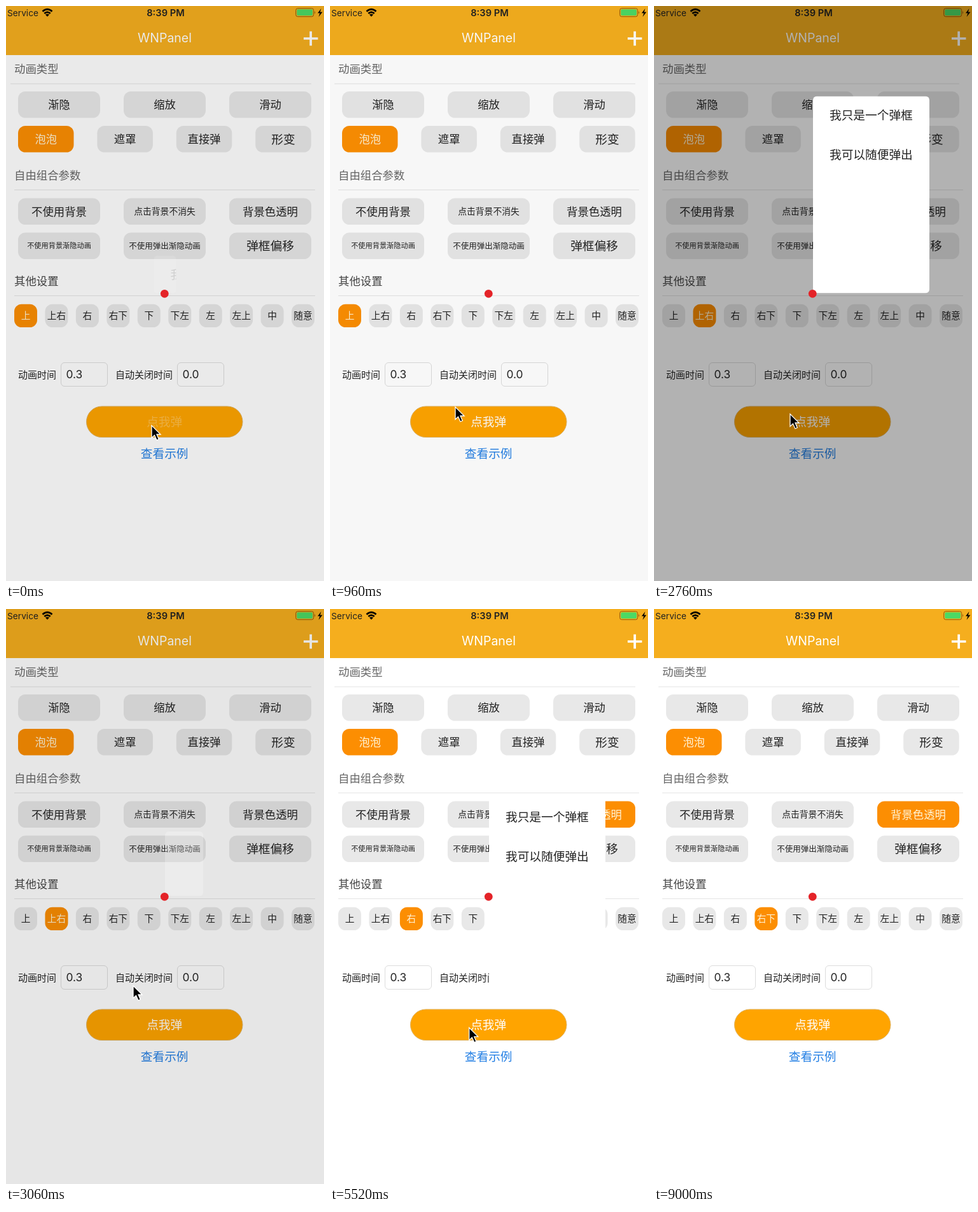
An HTML page for the animation above (9.3 s loop, 500x902 px).

```html
<!DOCTYPE html>
<html lang="zh-CN">
<head>
<meta charset="utf-8">
<title>Popup demo</title>
<style>
html, body { margin: 0; width: 100%; height: 100%; overflow: hidden; background: #fff; }
#stage { display: block; width: 100%; height: 100%; }
text { font-family: Inter, "Noto Sans CJK SC", "Noto Sans CJK", sans-serif; fill: #222; }
.chip rect { fill: #e8e8e8; }
.chip.on rect { fill: #fc8e02; }
.chip.on text { fill: #fff3d6; }
.rule { stroke: #e4e4e4; }
.field { fill: #fff; stroke: #dcdcdc; }
</style>
</head>
<body>
<svg id="stage" viewBox="0 0 500 902" preserveAspectRatio="none">
  <rect width="500" height="902" fill="#fff"/>
  <rect width="500" height="77" fill="#f5ae1e"/>
  <g id="status">
    <path d="M57.5 8.5Q65 1.8 72.5 8.5M60.3 11.7Q65 7.5 69.7 11.7" fill="none" stroke="#000" stroke-width="2.7"/>
    <path d="M62 13.6Q65 11.2 68 13.6L65 16.8Z"/>
    <rect x="455.7" y="3.7" width="28" height="13" rx="3" fill="none" stroke="#8a5c10"/>
    <rect x="457.3" y="5.3" width="24.8" height="9.8" rx="1.8" fill="#4cd964"/>
    <path d="M485.2 8q2.2 2.2 0 4.4z" fill="#8a5c10"/>
    <path d="M495.5 4L490 11.2h3.4L491.6 17L497.5 9.4h-3.6z"/>
  </g>
  <path d="M468 51H490.500M479.200 39.700V62.300" stroke="#fff" stroke-width="3.700"/>
  <path class="rule" d="M7 122H480M13 288.500H486M13 454.500H486"/>
  <g id="ui"></g>
  <rect id="dim" width="500" height="902"/>
  <svg id="popup">
    <rect width="100%" height="100%" rx="6" fill="#fff"/>
    <g id="message"></g>
  </svg>
  <circle cx="249.300" cy="451.300" r="6.400" fill="#e42328"/>
  <path id="cursor" d="M0 0V19.500L4.500 15.300L8 23L11.300 21.500L8 14H14Z"
        stroke="#fff" stroke-width="1.300"/>
</svg>
<script>
const $ = id => document.getElementById(id);
const ui = $('ui');

function add(parent, tag, attrs, content) {
  const el = document.createElementNS('http://www.w3.org/2000/svg', tag);
  for (const key in attrs) el.setAttribute(key, attrs[key]);
  if (content) el.textContent = content;
  parent.append(el);
  return el;
}

// y is the vertical centre of the glyphs
function label(parent, str, x, y, size, attrs) {
  return add(parent, 'text', { x, y: y + size * .37, 'font-size': size, ...attrs }, str);
}

function chip(str, x, y, w, h, size, on) {
  const g = add(ui, 'g', { class: on ? 'chip on' : 'chip' });
  add(g, 'rect', { x, y, width: w, height: h, rx: 11.5 });
  label(g, str, x + w / 2, y + h / 2, size, { 'text-anchor': 'middle' });
  return g;
}

function row(y, w, gap, items) {
  return items.map(([str, size, on], i) => chip(str, 19 + i * gap, y, w, 41.5, size, on));
}

const middle = { 'text-anchor': 'middle' };
label($('status'), 'Service', 2, 11, 13.7, {});
label($('status'), '8:39 PM', 251, 11, 14.7, { ...middle, 'font-weight': 600 });
label(ui, 'WNPanel', 249.5, 50, 19.5, { ...middle, style: 'fill:#fff' });

label(ui, '动画类型', 13, 99, 17.4, { style: 'fill:#666' });
label(ui, '自由组合参数', 13, 265.5, 17.4, { style: 'fill:#666' });
label(ui, '其他设置', 13, 432, 17.4, { style: 'fill:#444' });

row(134, 129, 166, [['渐隐', 17.3], ['缩放', 17.3], ['滑动', 17.3]]);
row(188, 87.5, 124.4, [['泡泡', 17.3, true], ['遮罩', 17.3], ['直接弹', 17.3], ['形变', 18.7]]);
const clearBackdrop = row(301.5, 129, 166,
  [['不使用背景', 17.4], ['点击背景不消失', 13.8], ['背景色透明', 17.4]])[2];
row(355.5, 129, 166, [['不使用背景渐隐动画', 11.2], ['不使用弹出渐隐动画', 12.5], ['弹框偏移', 18.7]]);

const directions = ['上', '上右', '右', '右下', '下', '下左', '左', '左上', '中', '随意']
  .map((str, i) => chip(str, 13 + i * 48.45, 467.7, 36, 36.3, 14.7));

for (const [str, x, fieldX, value] of [['动画时间', 19, 86.5, '0.3'], ['自动关闭时间', 172, 269.5, '0.0']]) {
  label(ui, str, x, 578.5, 15, {});
  add(ui, 'rect', { class: 'field', x: fieldX, y: 559.5, width: 73, height: 37, rx: 5.5 });
  label(ui, value, fieldX + 8, 578, 17.4, {});
}

add(ui, 'rect', { x: 126.5, y: 628, width: 245.5, height: 48.5, rx: 24.2, fill: '#ffa400', stroke: '#dfb566' });
const buttonText = label(ui, '点我弹', 249.2, 652.5, 18.7, { ...middle, style: 'fill:#fff' });
label(ui, '查看示例', 249.2, 702, 18.7, { ...middle, style: 'fill:#237fe4' });

const popup = $('popup'), message = $('message');
label(message, '我只是一个弹框', 26, 30, 18.7, {});
label(message, '我可以随便弹出', 26, 92, 18.7, {});

const LOOP = 9300, STEP = 60, LAST = 9000, FADE = 300;
const POPUP_W = 183, POPUP_H = 309, MAX_DIM = .3;

// open, close: start times; ax, ay: share of the popup left of and above the anchor
const shows = [
  { open: -84, close: 720, ax: .5, ay: 1, dim: MAX_DIM },
  { open: 2196, close: 2875, ax: 0, ay: 1, dim: MAX_DIM },
  { open: 4860, close: 5800, ax: 0, ay: .5, dim: 0 },
  { open: 7500, close: 8280, ax: 0, ay: 0, dim: 0 }
];
const picks = [0, 1620, 3540, 6420];
const CLEAR_AT = 4260;

const path = [
  [0, 229, 658], [360, 226, 656], [960, 197, 629], [1560, 73, 480], [1680, 74, 481],
  [2160, 213, 648], [2340, 215, 649], [2760, 214, 640], [3060, 200, 591],
  [3480, 124, 482], [3600, 125, 483], [4140, 438, 331], [4320, 438, 331],
  [4780, 222, 652], [5800, 218, 658], [6350, 172, 484], [6500, 173, 485],
  [7080, 183, 699], [7400, 205, 655], [8400, 207, 658], [8640, 212, 735], [8940, 230, 910], [9300, 230, 930]
];

const clamp = u => Math.min(1, Math.max(0, u));
const smooth = u => clamp(u) ** 2 * (3 - 2 * clamp(u));

function cursorAt(t) {
  const i = path.findIndex(p => p[0] > t);
  const [t0, x0, y0] = path[i - 1], [t1, x1, y1] = path[i];
  const k = smooth((t - t0) / (t1 - t0));
  return [x0 + (x1 - x0) * k, y0 + (y1 - y0) * k];
}

function drawPopup(t, show) {
  popup.style.display = show ? '' : 'none';
  $('dim').setAttribute('opacity', 0);
  if (!show) return;

  const opened = (t - show.open) / FADE, closed = (t - show.close) / FADE;
  const size = smooth(opened) * (1 - smooth(closed));
  const w = POPUP_W * size, h = POPUP_H * size;
  popup.setAttribute('x', 250 - w * show.ax);
  popup.setAttribute('y', 450.5 - h * show.ay);
  popup.setAttribute('width', w);
  popup.setAttribute('height', h);
  popup.style.opacity = size ** 1.25;
  // the message vanishes as soon as the popup starts to shrink
  message.style.display = closed > 0 ? 'none' : '';
  $('dim').setAttribute('opacity', show.dim * clamp(opened) * (1 - smooth(closed)));
}

function draw(t) {
  drawPopup(t, shows.find(s => t > s.open && t < s.close + FADE));

  const picked = picks.filter(at => t >= at).length - 1;
  directions.forEach((el, i) => el.classList.toggle('on', i === picked));
  clearBackdrop.classList.toggle('on', t >= CLEAR_AT);

  const pressed = shows.some(s => t >= s.open - 60 && t < s.open + 200);
  buttonText.setAttribute('opacity', pressed ? .28 : 1);

  $('cursor').setAttribute('transform', `translate(${cursorAt(t)})`);
}

const began = performance.now();
function tick() {
  const t = Math.max(0, performance.now() - began) % LOOP;
  draw(Math.min(LAST, Math.floor(t / STEP) * STEP));
  requestAnimationFrame(tick);
}
tick();
</script>
</body>
</html>
```
